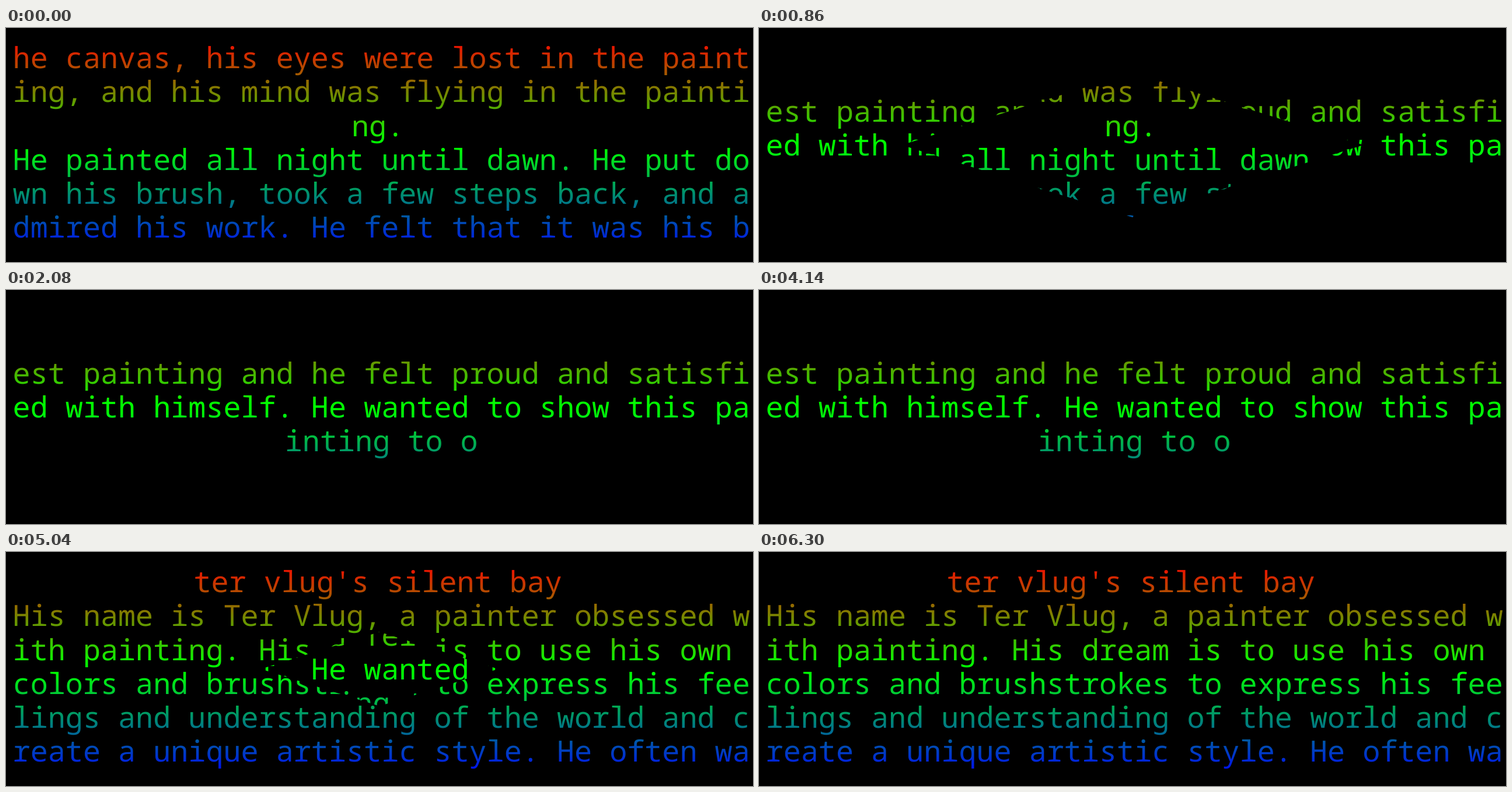
An HTML page for the animation above (6.32 s loop, 1280 px wide and 402 px high).

```html
<!DOCTYPE html>
<html lang="en">
<head>
<meta charset="utf-8">
<title>Painter story</title>
<style>
  html, body { margin: 0; width: 100%; height: 100%; overflow: hidden; background: #000; }
  svg { display: block; width: 1280px; height: 402px; }
  text {
    font: 50.13px "Noto Sans Mono", "DejaVu Sans Mono", monospace;
    font-variant-ligatures: none;
    text-rendering: geometricPrecision;
    white-space: pre;
    fill: url(#ink);
  }
</style>
</head>
<body>
<svg id="stage" viewBox="0 0 1280 402" xmlns="http://www.w3.org/2000/svg">
  <defs>
    <linearGradient id="ink" gradientUnits="userSpaceOnUse" x1="0" y1="16" x2="0" y2="386">
      <stop offset="0" stop-color="#f00"/>
      <stop offset=".486" stop-color="#0f0"/>
      <stop offset=".514" stop-color="#0f0"/>
      <stop offset="1" stop-color="#00f"/>
    </linearGradient>
    <clipPath id="iris"><polygon id="diamond"/></clipPath>
  </defs>
</svg>
<script>
const NS = "http://www.w3.org/2000/svg";
const W = 1280, H = 402, LOOP = 6320, WIPE = 1165;
const LEFT = 11.6, PITCH = 58.2;

// Each page: first baseline, lines, and the x of lines that do not start at LEFT.
const pages = [
  {
    top: 69.2,
    lines: [
      "he canvas, his eyes were lost in the paint",
      "ing, and his mind was flying in the painti",
      "ng.",
      "He painted all night until dawn. He put do",
      "wn his brush, took a few steps back, and a",
      "dmired his work. He felt that it was his b"
    ],
    indent: { 2: 592 }
  },
  {
    top: 161,
    lines: [
      "est painting and he felt proud and satisfi",
      "ed with himself. He wanted to show this pa",
      "inting to o"
    ],
    indent: { 2: 477.8 }
  },
  {
    top: 69.2,
    lines: [
      "ter vlug's silent bay",
      "His name is Ter Vlug, a painter obsessed w",
      "ith painting. His dream is to use his own ",
      "colors and brushstrokes to express his fee",
      "lings and understanding of the world and c",
      "reate a unique artistic style. He often wa"
    ],
    indent: { 0: 321.4 }
  }
];

// A wipe shows page `to` around a shrinking diamond that still holds page `from`.
const wipes = [
  { start: 56, from: 0, to: 1 },
  { start: 4061, from: 1, to: 2 }
];

const stage = document.getElementById("stage");
const diamond = document.getElementById("diamond");

function add(parent, tag, attrs) {
  const node = document.createElementNS(NS, tag);
  for (const key in attrs) node.setAttribute(key, attrs[key]);
  return parent.appendChild(node);
}

const groups = pages.map(({ top, lines, indent }) => {
  const group = add(stage, "g", {});
  add(group, "rect", { width: W, height: H, fill: "#000" });
  lines.forEach((line, i) => {
    const x = indent[i] ?? LEFT;
    add(group, "text", { x, y: top + i * PITCH }).textContent = line;
  });
  return group;
});
// Earlier pages lie on top of later ones.
groups.slice().reverse().forEach(group => stage.appendChild(group));

function draw(t) {
  const wipe = t < wipes[1].start ? wipes[0] : wipes[1];
  const p = Math.min(1, Math.max(0, (t - wipe.start) / WIPE));
  const size = 2 * (1 - p);
  const cx = W / 2, cy = H / 2, rx = cx * size, ry = cy * size;
  diamond.setAttribute("points",
    `${cx - rx},${cy} ${cx},${cy - ry} ${cx + rx},${cy} ${cx},${cy + ry}`);

  groups.forEach((group, i) => {
    const shown = i === wipe.to || (i === wipe.from && p < 1);
    group.style.display = shown ? "" : "none";
    if (i === wipe.from) group.setAttribute("clip-path", "url(#iris)");
    else group.removeAttribute("clip-path");
  });
}

const begin = performance.now();
function tick() {
  draw((performance.now() - begin) % LOOP);
  requestAnimationFrame(tick);
}
tick();
</script>
</body>
</html>
```
